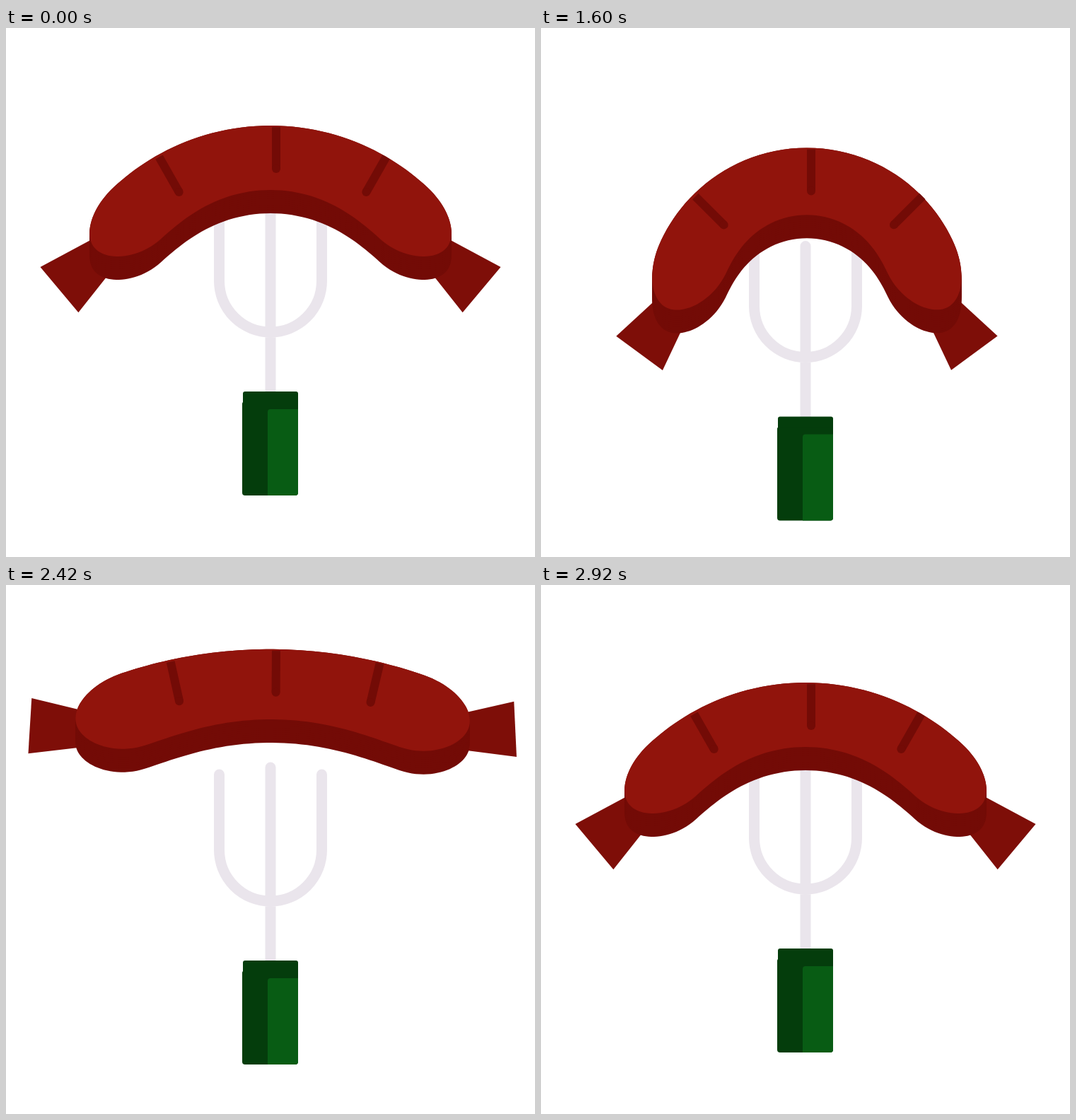
An HTML page with a canvas that plays this animation: 748 px wide and 748 px high, repeating every 2.95 s.

```html
<!DOCTYPE html>
<html lang="en">
<head>
<meta charset="utf-8">
<title>Sausage toss</title>
<style>
html, body { margin: 0; width: 100%; height: 100%; overflow: hidden; background: #fff; }
canvas { display: block; }
</style>
</head>
<body>
<canvas id="stage" width="748" height="748"></canvas>
<script>
const ctx = document.getElementById('stage').getContext('2d');
const LOOP = 2950, MID = 374, APEX = 2058;
const LIGHT = '#91140c', DARK = '#730b06', TAIL = '#7e0e08';
const STEEL = '#eae5ec', GREEN = '#085c14', SHADE = '#043d0c';

// Key points in time: wind up, throw, swing back, catch, settle
const forkKeys = [[1000, 0], [1490, 77], [1600, 36], [1690, -30], [1820, 16],
  [2120, 79], [2220, 64], [2550, -18], [2660, -51], [2920, 0]];
const bendKeys = [[1000, 0.75], [1260, 0.63], [1480, 0.75], [1600, 1.14], [1820, 0.95],
  [2220, 0.245], [2330, 0.05], [2540, 0.74], [2730, 0.63], [2920, 0.75]];
const airKeys = [[1480, 0], [1800, 1], [2350, 1], [2540, 0]];
const tineKeys = [[1500, 265], [1600, 241], [1800, 277], [2220, 273]];

// Monotone cubic interpolation through [time, value] keys
function curve(keys, t) {
  const last = keys.length - 1;
  if (t <= keys[0][0]) return keys[0][1];
  if (t >= keys[last][0]) return keys[last][1];
  const slope = i => (keys[i + 1][1] - keys[i][1]) / (keys[i + 1][0] - keys[i][0]);
  const tangent = i => {
    if (i === 0 || i === last) return 0;
    const a = slope(i - 1), b = slope(i);
    return a * b > 0 ? 2 * a * b / (a + b) : 0;
  };
  const i = keys.findIndex(k => k[0] > t) - 1;
  const [t0, a] = keys[i], [t1, b] = keys[i + 1];
  const h = t1 - t0, u = (t - t0) / h, v = 1 - u;
  return a * v * v * (1 + 2 * u) + b * u * u * (3 - 2 * u)
    + h * u * v * (tangent(i) * v - tangent(i + 1) * u);
}

// Height of the free flight: a braked rise, then a fall under gravity
function flight(t) {
  const dt = Math.abs(t - APEX);
  return -121 + (t < APEX ? 14 * (dt / 238) ** 3.66 : 5.6e-4 * dt * dt);
}

const mirror = ([x, y]) => [-x, y];

function polygon(points, color) {
  ctx.fillStyle = color;
  ctx.beginPath();
  points.forEach(p => ctx.lineTo(...p));
  ctx.fill();
}

function box(x, y, w, h, radii, color) {
  ctx.fillStyle = color;
  ctx.beginPath();
  ctx.roundRect(x, y, w, h, radii);
  ctx.fill();
}

function drawFork(y, tine) {
  ctx.save();
  ctx.translate(MID, 514 + y);
  ctx.strokeStyle = STEEL;
  ctx.lineCap = 'round';
  ctx.lineWidth = 15;
  ctx.beginPath();
  ctx.moveTo(-72.5, 10 - tine);
  ctx.arc(0, -156.5, 72.5, Math.PI, 0, true);
  ctx.lineTo(72.5, 10 - tine);
  ctx.moveTo(0, -tine);
  ctx.lineTo(0, 10);
  ctx.stroke();
  box(-39, 0, 78, 60, 3, SHADE);
  box(-40, 15, 79, 132, [2, 0, 4, 4], SHADE);
  box(-4, 25, 43, 122, [4, 0, 4, 0], GREEN);
  ctx.restore();
}

function drawMark([x1, y1], [x2, y2]) {
  ctx.beginPath();
  ctx.moveTo(x1, y1);
  ctx.lineTo(x2, y2);
  ctx.stroke();
  ctx.beginPath();
  ctx.arc(x2, y2, 6, 0, 7);
  ctx.fill();
}

// A tube along an arc with straight, tapering ends; the origin is its top centre
function drawSausage(y, bend, air) {
  const half = 45.5 + 6 * air, arc = 210 - 14 * air, cap = 78 + 10 * air;
  const total = arc + cap, radius = arc / bend, drift = 5.5 * air;

  // Point at distance s along the spine and n outward from it
  const at = (s, n) => {
    const a = bend * Math.min(s, arc) / arc, rest = Math.max(0, s - arc);
    const sin = Math.sin(a), cos = Math.cos(a);
    return [(radius + n) * sin + rest * cos, half + radius - (radius + n) * cos + rest * sin];
  };

  const top = [], belly = [];
  for (let i = 0; i <= 50; i++) {
    const u = Math.sin(i / 50 * Math.PI / 2), s = u * total;
    const h = half * Math.sqrt(Math.max(0, 1 - (Math.max(0, s - arc) / cap) ** 2));
    top.push(at(s, h));
    belly.unshift(at(s, -h - 8 * Math.sin(Math.PI * u * u)));
  }
  const right = [...top, ...belly];
  const outline = [...right, ...right.map(mirror).reverse()];

  // The tail swings further than the body bends
  const swing = -0.98 + 3.3 * bend - 1.42 * bend * bend;
  const sin = Math.sin(swing), cos = Math.cos(swing);
  const [tipX, tipY] = at(total, 0);
  const tailPoint = (along, across) =>
    [tipX + along * cos + across * sin, tipY + 16 * (1 - air) + along * sin - across * cos];
  const wide = 42 - 4 * air;
  const tail = [tailPoint(66, wide), tailPoint(66, -wide), tailPoint(-25, -23), tailPoint(-25, 23)];

  ctx.save();
  ctx.translate(MID + drift, 138 + y);
  ctx.rotate(0.015 * air * (1 - bend));
  polygon(tail, TAIL);
  polygon(tail.map(mirror), TAIL);
  for (let d = 33; d >= 0; d -= 3) polygon(outline.map(([px, py]) => [px, py + d]), DARK);
  polygon(outline, LIGHT);

  ctx.fillStyle = ctx.strokeStyle = DARK;
  ctx.lineWidth = 12;
  drawMark([8 - drift, 2], [8 - drift, 61]);
  const mark = [at(0.69 * arc, half - 1), at(0.69 * arc, half - 58)];
  ctx.translate(3, 1);
  drawMark(...mark);
  drawMark(...mark.map(mirror));
  ctx.restore();
}

function draw(t) {
  const forkY = curve(forkKeys, t);
  ctx.fillStyle = '#fff';
  ctx.fillRect(0, 0, 748, 748);
  drawFork(forkY, curve(tineKeys, t));
  // The fork carries the sausage unless it flies above
  drawSausage(Math.min(forkY, flight(t)), curve(bendKeys, t), curve(airKeys, t));
}

const start = performance.now();
function tick() {
  draw((performance.now() - start) % LOOP);
  requestAnimationFrame(tick);
}
tick();
</script>
</body>
</html>
```
